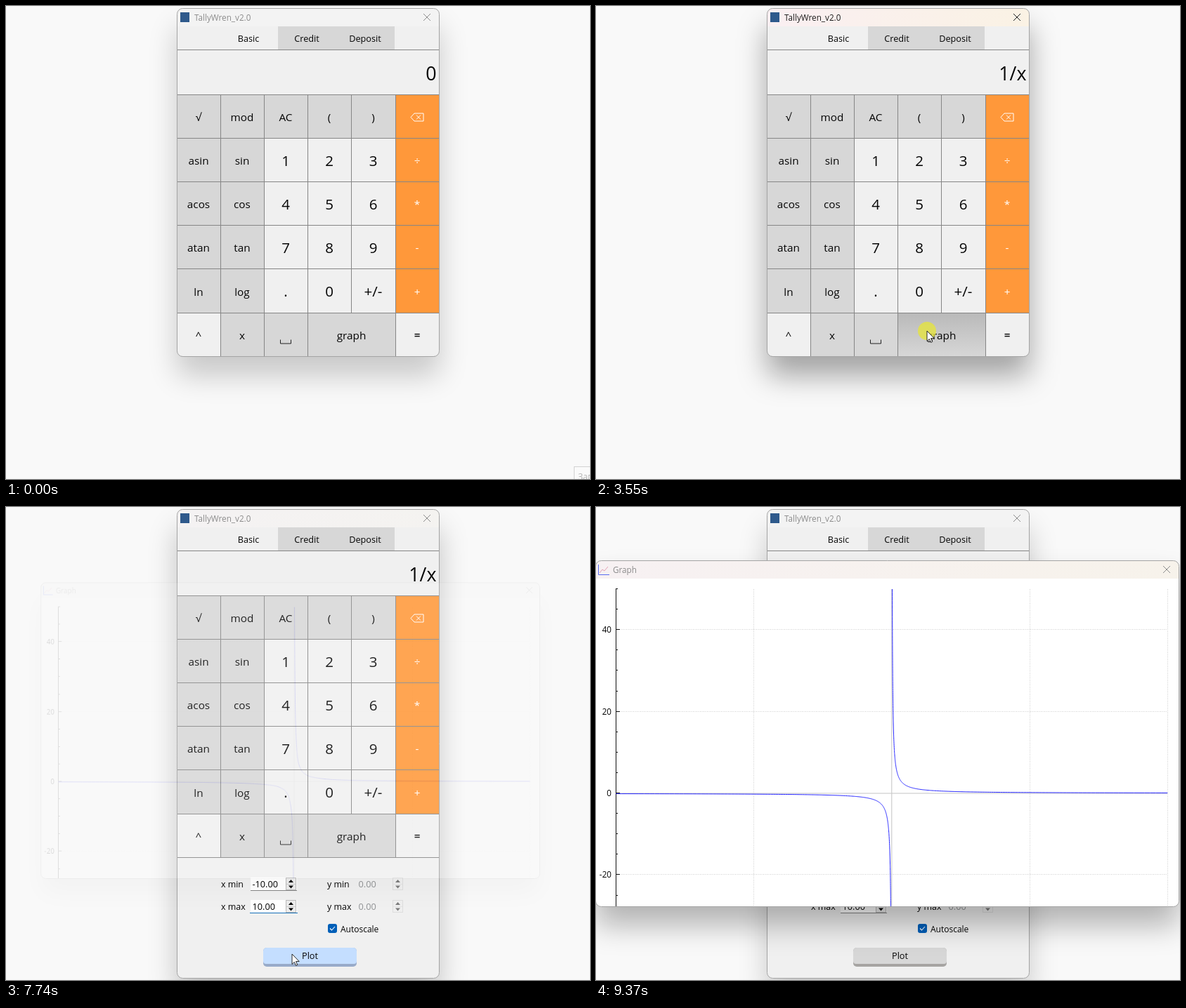
These frames come from a looping animation (831x674 px, 9.44 s). An HTML page with a canvas:

```html
<!DOCTYPE html>
<html lang="en">
<head>
<meta charset="utf-8">
<title>Calculator</title>
<style>
html, body { margin: 0; width: 100%; height: 100%; overflow: hidden; background: #f9f9f9; }
canvas { display: block; }
</style>
</head>
<body>
<canvas id="stage" width="831" height="674"></canvas>
<script>
const W = 831, H = 674, LOOP = 9440, PAD = 100;
const stage = document.getElementById('stage').getContext('2d');
const layer = document.createElement('canvas');
layer.width = W + 2 * PAD;
layer.height = H + 2 * PAD;
let c = stage;

const FONT = '"Open Sans", "Noto Sans", sans-serif';
const INK = '#050505', GREY = '#d7d7d7', LIGHT = '#f0f0f0', ORANGE = '#ff983a', LINE = '#868686';
const KEYS = [
  '√ mod AC ( ) ⌫', 'asin sin 1 2 3 ÷', 'acos cos 4 5 6 *',
  'atan tan 7 8 9 -', 'ln log . 0 +/- +', '^ x ␣ graph _ ='
].map(row => row.split(' '));

// time, x, y of the pointer
const PATH = [
  [0, 790, 700], [70, 780, 670], [830, 406, 218], [1510, 406, 218],
  [1790, 583, 226], [1950, 583, 226], [2240, 339, 463], [2420, 339, 463],
  [2950, 471, 463], [3690, 471, 463], [4240, 346, 536], [4310, 347, 536],
  [4560, 347, 536], [4580, 349, 537], [5000, 349, 537], [5250, 357, 538],
  [5950, 357, 538], [6430, 350, 570], [6960, 350, 570], [7410, 407, 637],
  [8500, 407, 637], [9170, 770, 690], [LOOP, 770, 690]
];
// start, end, key row, key column
const CLICKS = [
  [970, 1100, 1, 2], [1850, 1920, 1, 5], [2320, 2385, 5, 1], [3420, 3680, 5, 3],
  [4790, 4990], [6570, 6700], [7540, 7660]
];

const clamp = v => Math.max(0, Math.min(1, v));
const ramp = (t, from, length) => clamp((t - from) / length);
const colX = i => Math.floor(243.1 + 62.2 * i);
const rowY = i => Math.floor(126.1 + 62.2 * i);

function rect(x, y, w, h, color) {
  c.fillStyle = color;
  c.fillRect(x, y, w, h);
}

function round(x, y, w, h, r, color) {
  c.beginPath();
  c.roundRect(x, y, w, h, r);
  c.fillStyle = color;
  c.fill();
}

function line(points, color, width = 1) {
  c.beginPath();
  points.forEach(([x, y]) => c.lineTo(x, y));
  c.strokeStyle = color;
  c.lineWidth = width;
  c.stroke();
}

function text(s, x, y, size, color = INK, align = 'left', weight = 400) {
  c.font = `${weight} ${size}px ${FONT}`;
  c.textAlign = align;
  c.fillStyle = color;
  c.fillText(s, x, y);
}

function pointerAt(t) {
  const i = PATH.findIndex(p => p[0] > t);
  const [t0, x0, y0] = PATH[i - 1], [t1, x1, y1] = PATH[i];
  const k = (t - t0) / (t1 - t0), e = k * k * (3 - 2 * k);
  return { x: x0 + (x1 - x0) * e, y: y0 + (y1 - y0) * e };
}

function openWindow(x, y, w, h, focus) {
  c.save();
  c.shadowColor = `rgba(0,0,0,${0.2 + 0.15 * focus})`;
  c.shadowBlur = 42;
  c.shadowOffsetY = 27;
  round(x, y, w, h, 8, LIGHT);
  c.restore();
  c.save();
  c.beginPath();
  c.roundRect(x, y, w, h, 8);
  c.clip();
}

function closeWindow(x, y, w, h) {
  c.restore();
  c.beginPath();
  c.roundRect(x, y, w, h, 8);
  c.strokeStyle = '#a4a4a4';
  c.lineWidth = 1;
  c.stroke();
}

function titleBar(x, y, w, name, nameX, closeX, focus, active) {
  rect(x, y, w, 26, '#f3f3f3');
  const g = c.createLinearGradient(x, 0, x + w, 0);
  g.addColorStop(0, '#faeff2');
  g.addColorStop(1, '#faf2e4');
  c.save();
  c.globalAlpha *= focus;
  rect(x, y, w, 26, g);
  c.restore();
  const ink = active ? '#1c1c1c' : '#8c8c8c', my = y + 13;
  text(name, nameX, my + 5, 11.7, ink);
  line([[closeX - 5, my - 5], [closeX + 5, my + 5]], ink);
  line([[closeX - 5, my + 5], [closeX + 5, my - 5]], ink);
}

function backspaceIcon(x, y) {
  line([[x - 9, y], [x - 4, y - 5.5], [x + 9, y - 5.5], [x + 9, y + 5.5], [x - 4, y + 5.5], [x - 9, y]], '#fff');
  line([[x - 1, y - 3], [x + 5, y + 3]], '#fff');
  line([[x - 1, y + 3], [x + 5, y - 3]], '#fff');
}

function key(label, row, col, pressed) {
  const x = colX(col), y = rowY(row);
  const w = colX(col + (label === 'graph' ? 2 : 1)) - x, h = rowY(row + 1) - y;
  const orange = col === 5 && row < 5;
  const big = /^(\d|\.|\+\/-)$/.test(label);
  rect(x, y, w, h, orange ? ORANGE : big || '^='.includes(label) ? LIGHT : GREY);
  if (pressed) {
    const g = c.createLinearGradient(0, y, 0, y + h);
    g.addColorStop(0, 'rgba(0,0,0,.14)');
    g.addColorStop(1, 'rgba(0,0,0,0)');
    rect(x, y, w, h, g);
  }
  const mx = x + w / 2, my = y + h / 2 + 1.5;
  if (label === '⌫') backspaceIcon(mx, my);
  else if (label === '␣') line([[mx - 7.5, my + 6], [mx - 7.5, my + 11.5], [mx + 7.5, my + 11.5], [mx + 7.5, my + 6]], '#222');
  else {
    const size = big ? 20.5 : 15.3;
    text(label, mx, my + size * 0.36, size, orange ? '#fff' : INK, 'center', label === '=' ? 600 : 400);
  }
  rect(x, y, w + 1, 1, LINE);
  rect(x, y, 1, h, LINE);
  rect(x, y + h, w + 1, 1, LINE);
}

function arrow(x, y, dir, color) {
  c.beginPath();
  c.moveTo(x - 3.5, y + 2 * dir);
  c.lineTo(x + 3.5, y + 2 * dir);
  c.lineTo(x, y - 2 * dir);
  c.fillStyle = color;
  c.fill();
}

function spinBox(label, x, y, value, enabled, focused) {
  const fx = x + 42;
  text(label, x, y + 4.5, 12.4);
  if (enabled) rect(fx, y - 9, 66, 18, '#fff');
  text(value, fx + 2.5, y + 4.5, 12.7, enabled ? INK : '#929496');
  const bx = enabled ? fx + 50 : fx + 51;
  rect(bx, y - 9, 15, 18, enabled ? '#bcbcbc' : '#dedede');
  rect(bx + 1, y - 8, 13, 16, enabled ? '#ececec' : '#efefef');
  rect(bx + 1, y, 13, 1, enabled ? '#d0d0d0' : '#e4e4e4');
  const ink = enabled ? INK : '#7c7c7c';
  arrow(bx + 7.5, y - 4, 1, ink);
  arrow(bx + 7.5, y + 4.5, -1, ink);
  if (enabled) rect(fx - (focused ? 1 : 0), y + 9, focused ? 68 : 66, 1, focused ? '#1670b8' : '#868686');
}

function plotPanel(t, pointer) {
  const xMin = t < 5600 ? '0.00' : t < 5800 ? '-0.00' : '-10.00';
  spinBox('x min', 306, 537, xMin, true, false);
  spinBox('x max', 306, 569, t < 6850 ? '0.00' : '10.00', true, t >= 6430 && t < 7800);
  spinBox('y min', 457, 537, '0.00', false);
  spinBox('y max', 457, 569, '0.00', false);

  round(458, 594, 13, 13, 3, '#005fb8');
  line([[461, 600.5], [463.5, 603], [468, 598]], '#fff', 1.1);
  text('Autoscale', 476, 606, 12);

  const hover = pointer.x > 366 && pointer.x < 499 && pointer.y > 628 && pointer.y < 655;
  round(366, 628, 133, 27, 5, hover ? '#98abc9' : '#a6a4a2');
  round(366, 628, 133, 23, [5, 5, 4, 4], hover ? '#c4deff' : GREY);
  text('Plot', 432.5, 644, 12.7, INK, 'center');
}

function calculator(t, pointer) {
  const open = t >= 3680;
  const box = [243.5, 3.5, 373, open ? 668 : 496];
  const focus = ramp(t, 900, 140) * (1 - ramp(t, 7660, 100));
  openWindow(...box, focus);
  titleBar(243, 3, 374, 'TallyWren_v2.0', 268, 599, focus, t >= 970 && t < 7740);
  rect(248, 9, 13, 14, '#2f5a8c');

  rect(387, 29, 166, 33, GREY);
  text('Basic', 345, 51, 12.6, INK, 'center');
  text('Credit', 428, 51, 12.7, INK, 'center');
  text('Deposit', 511, 51, 12.7, INK, 'center');
  rect(243, 62, 374, 1, LINE);

  const shown = t < 1100 ? '0' : t < 1920 ? '1' : t < 2385 ? '1/' : '1/x';
  text(shown, 612.5, 106, 26.8, INK, 'right');

  const down = CLICKS.find(k => t >= k[0] && t < k[1]);
  KEYS.forEach((row, r) => row.forEach((label, i) => {
    if (label !== '_') key(label, r, i, down && down[2] === r && down[3] === i);
  }));
  if (open) plotPanel(t, pointer);
  closeWindow(...box);
}

function chart() {
  const x0 = 420.8, y0 = 408, ux = 39.25, uy = 5.82;
  c.setLineDash([1, 1.5]);
  [224.5, 617.5, 813.5].forEach(x => line([[x, 117], [x, 570]], '#cfcfcf'));
  [40, 20, -20].forEach(v => {
    const y = Math.round(y0 - v * uy) - 0.5;
    line([[28, y], [813, y]], '#cfcfcf');
  });
  c.setLineDash([]);
  line([[28, 408], [813, 408]], '#c4c4c4');
  line([[420.8, 117], [420.8, 570]], '#c4c4c4');

  line([[28.5, 116.5], [28.5, 570]], '#111');
  for (let v = -25; v <= 50; v += 5) {
    const y = Math.round(y0 - v * uy) - 0.5, major = v % 20 === 0;
    line([[28, y], [major ? 34 : 31, y]], '#111');
    if (major) text(String(v), 22, y + 4.5, 11.7, INK, 'right');
  }

  c.save();
  c.beginPath();
  c.rect(28, 117, 786, 453);
  c.clip();
  for (const side of [-1, 1]) {
    const points = [];
    for (let k = 0; k <= 300; k++) {
      const x = side * 10 * Math.pow(0.0015, k / 300);
      points.push([x0 + x * ux, y0 - uy / x]);
    }
    line(points, '#1a1aff', 0.95);
  }
  c.restore();
}

function graphWindow(focus, active) {
  const box = [-0.5, 76.5, 830, 493];
  openWindow(...box, focus);
  titleBar(-1, 76, 831, 'Graph', 24, 812, focus, active);
  rect(-1, 102, 831, 468, '#fff');
  line([[3.5, 82], [3.5, 96.5], [19, 96.5]], '#5a6cf0');
  line([[5, 94], [9, 89], [12, 91], [17, 85]], '#e3a0b4');
  chart();
  closeWindow(...box);
}

function showGraph(t) {
  const age = t - 7740;
  if (age < 0) return;
  if (age > 400) {
    graphWindow(t < 9370 ? 1 : 0.55, t < 9370);
    return;
  }
  c = layer.getContext('2d');
  c.setTransform(1, 0, 0, 1, 0, 0);
  c.clearRect(0, 0, layer.width, layer.height);
  c.translate(PAD, PAD);
  graphWindow(clamp(age / 140), age > 60);
  c = stage;
  const rest = 0.148 * Math.exp(-age / 47.6);
  c.save();
  c.globalAlpha = clamp(0.12 + 0.88 * age / 135);
  c.translate(345 * rest + 70 * rest * (1 - rest / 0.148), 293 * rest);
  c.scale(1 - rest, 1 - rest);
  c.drawImage(layer, -PAD, -PAD);
  c.restore();
}

function cursor(t, { x, y }) {
  if (t < 70) return;
  if (CLICKS.some(k => t >= k[0] && t < k[1])) {
    c.beginPath();
    c.arc(x, y, 13, 0, 7);
    c.fillStyle = 'rgba(230,228,60,.78)';
    c.fill();
  }
  const inField = t > 3680 && x > 347.5 && x < 398 && ((y > 528 && y < 547) || (y > 560 && y < 579));
  if (inField) {
    line([[x, y - 6.5], [x, y + 6.5]], '#111', 1.1);
    line([[x - 3, y - 7], [x + 3, y - 7]], '#111');
    line([[x - 3, y + 7], [x + 3, y + 7]], '#111');
    return;
  }
  c.save();
  c.translate(x, y);
  c.scale(0.88, 0.88);
  c.beginPath();
  [[0, 0], [0, 16.5], [3.8, 13], [6.3, 18.6], [8.8, 17.5], [6.3, 12], [11.6, 12]].forEach(p => c.lineTo(...p));
  c.closePath();
  c.fillStyle = '#fff';
  c.fill();
  c.strokeStyle = '#222';
  c.lineWidth = 1.1;
  c.stroke();
  c.restore();
}

function hint() {
  rect(808, 656, 30, 30, '#d2d2d2');
  rect(809, 657, 30, 30, '#fafafa');
  text('Запись', 814, 674.5, 12, '#b4b4b4');
}

function draw(now) {
  const t = now % LOOP, pointer = pointerAt(t);
  rect(0, 0, W, H, '#f9f9f9');
  calculator(t, pointer);
  showGraph(t);
  if (t < 70) hint();
  cursor(t, pointer);
  requestAnimationFrame(draw);
}
requestAnimationFrame(draw);
</script>
</body>
</html>
```
